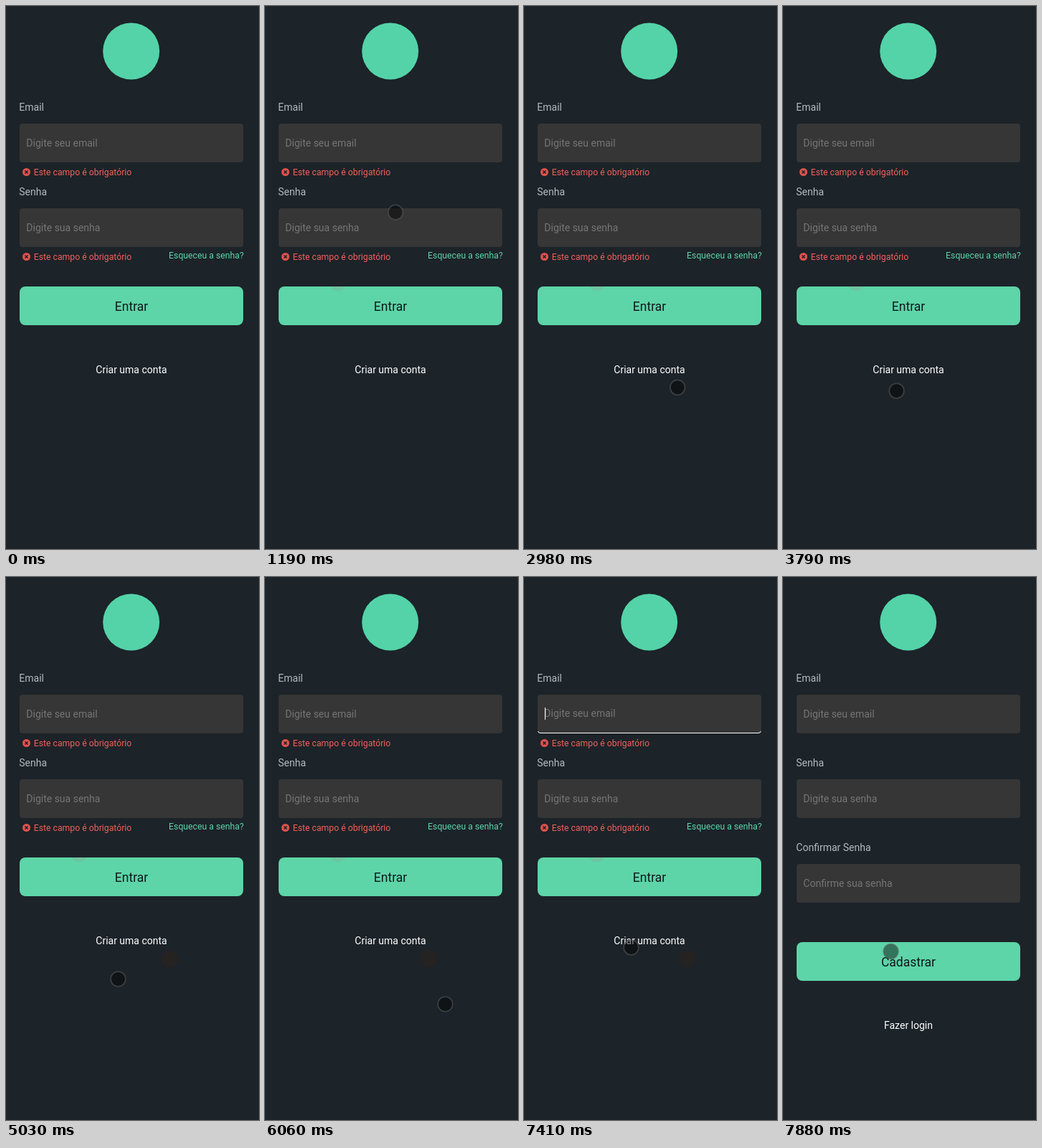
These frames come from a looping animation (353 px wide and 757 px high, 8000 ms). An HTML page:

```html
<!DOCTYPE html>
<html lang="pt-BR">
<head>
<meta charset="utf-8">
<title>Login</title>
<style>
  html, body { margin: 0; width: 100%; height: 100%; overflow: hidden; background: #1c2329; }
  svg { display: block; width: 353px; height: 757px; font: 14px Roboto, sans-serif; }
  .label { fill: #b1bcc0; }
  .field { fill: #363636; }
  .hint { fill: #757575; }
  .error { fill: #f4605b; font-size: 12.25px; }
  .dot { fill: #e0524d; }
  .cross { stroke: #1c2329; stroke-width: 1.6; }
  .button { fill: #5dd5a8; }
  .action { fill: #10171c; font-size: 17.5px; text-anchor: middle; }
  .link { fill: #fff; text-anchor: middle; }
  .forgot { fill: #5dd5a8; font-size: 12.25px; text-anchor: end; }
</style>
</head>
<body>
<svg viewBox="0 0 353 757">
  <circle id="logo" cx="174.7" cy="63" r="39.5" fill="#54d3a8"/>
  <g id="login"></g>
  <g id="signup"></g>
  <g id="focus">
    <path d="M19.5 215Q20 217.5 23 217.5H327Q330 217.5 330.5 215" fill="none" stroke="#fff"/>
    <rect x="29" y="182" width="1" height="17" fill="#fff"/>
  </g>
  <path id="smudge" d="M92 391a10 6 0 0 0 20 0" fill="#6cc5a2"/>
  <circle id="trail" cx="228.5" cy="532.5" r="12" fill="#252222"/>
  <circle id="cursor" r="10.3" fill="#000" fill-opacity=".45" stroke="#5a5a5a" stroke-opacity=".55" stroke-width="1.8"/>
</svg>
<script>
const LOOP = 8000;
const $ = id => document.getElementById(id);

const text = (cls, x, y, s) => `<text class="${cls}" x="${x}" y="${y}">${s}</text>`;
const field = (y, label, hint) =>
  text('label', 18.3, y + 146, label) +
  `<rect class="field" x="19" y="${y + 164}" width="312" height="54" rx="4"/>` +
  text('hint', 28.3, y + 196, hint);
const error = y =>
  `<circle class="dot" cx="28.5" cy="${y + 231.5}" r="5.5"/>` +
  `<path class="cross" d="M26.5 ${y + 229.5}l4 4m0-4l-4 4"/>` +
  text('error', 38.7, y + 236, 'Este campo é obrigatório');
const actions = (y, action, link) =>
  `<rect class="button" x="19" y="${y + 391}" width="312" height="54" rx="8"/>` +
  text('action', 175, y + 425, action) + text('link', 175, y + 512, link);

const email = field(0, 'Email', 'Digite seu email');
const password = field(118, 'Senha', 'Digite sua senha');
$('login').innerHTML = email + error(0) + password + error(118) +
  text('forgot', 331.8, 352, 'Esqueceu a senha?') + actions(0, 'Entrar', 'Criar uma conta');
$('signup').innerHTML = email + password + field(236, 'Confirmar Senha', 'Confirme sua senha') +
  actions(118, 'Cadastrar', 'Fazer login');
const emailHint = $('login').querySelector('.hint');

// Turning points of the pointer: time, x, y. It eases from one to the next.
const turns = [
  [590, 305, 768], [1000, 92, 400], [1330, 238, 218], [1810, 149, 347], [2220, 135.5, 328.5],
  [2720, 264, 430], [3120, 195, 571], [3790, 158.5, 536.5], [4060, 208, 424], [4400, 229, 532],
  [4690, 200, 616], [5030, 156.5, 560.5], [5640, 240, 657], [6060, 251.5, 595.5],
  [6350, 366, 660], [6640, 366, 330], [6940, 230, 205], [7410, 149.5, 516.5], [7680, 150.5, 522]
];

function pointerAt(t) {
  const next = turns.findIndex(turn => turn[0] > t);
  const b = turns.at(next);
  const a = turns[Math.max(next - 1, 0)];
  const k = Math.min(Math.max((t - a[0]) / (b[0] - a[0] || 1), 0), 1);
  const ease = next > 0 ? k * k * (3 - 2 * k) : 1;
  return [1, 2].map(i => a[i] + (b[i] - a[i]) * ease);
}

const show = (id, on) => $(id).setAttribute('visibility', on ? 'visible' : 'hidden');

function draw(now) {
  const t = now % LOOP;
  const signup = t >= 7610;
  const focused = t >= 6940 && t < 7540;
  show('login', !signup);
  show('signup', signup);
  show('logo', !signup || t >= 7880);
  show('focus', focused);
  show('smudge', t >= 1000 && !signup);
  show('trail', t >= 4400 && !signup);
  emailHint.setAttribute('y', focused ? 195 : 196);
  $('cursor').setAttribute('transform', `translate(${pointerAt(t)})`);
  requestAnimationFrame(draw);
}
requestAnimationFrame(draw);
</script>
</body>
</html>
```
